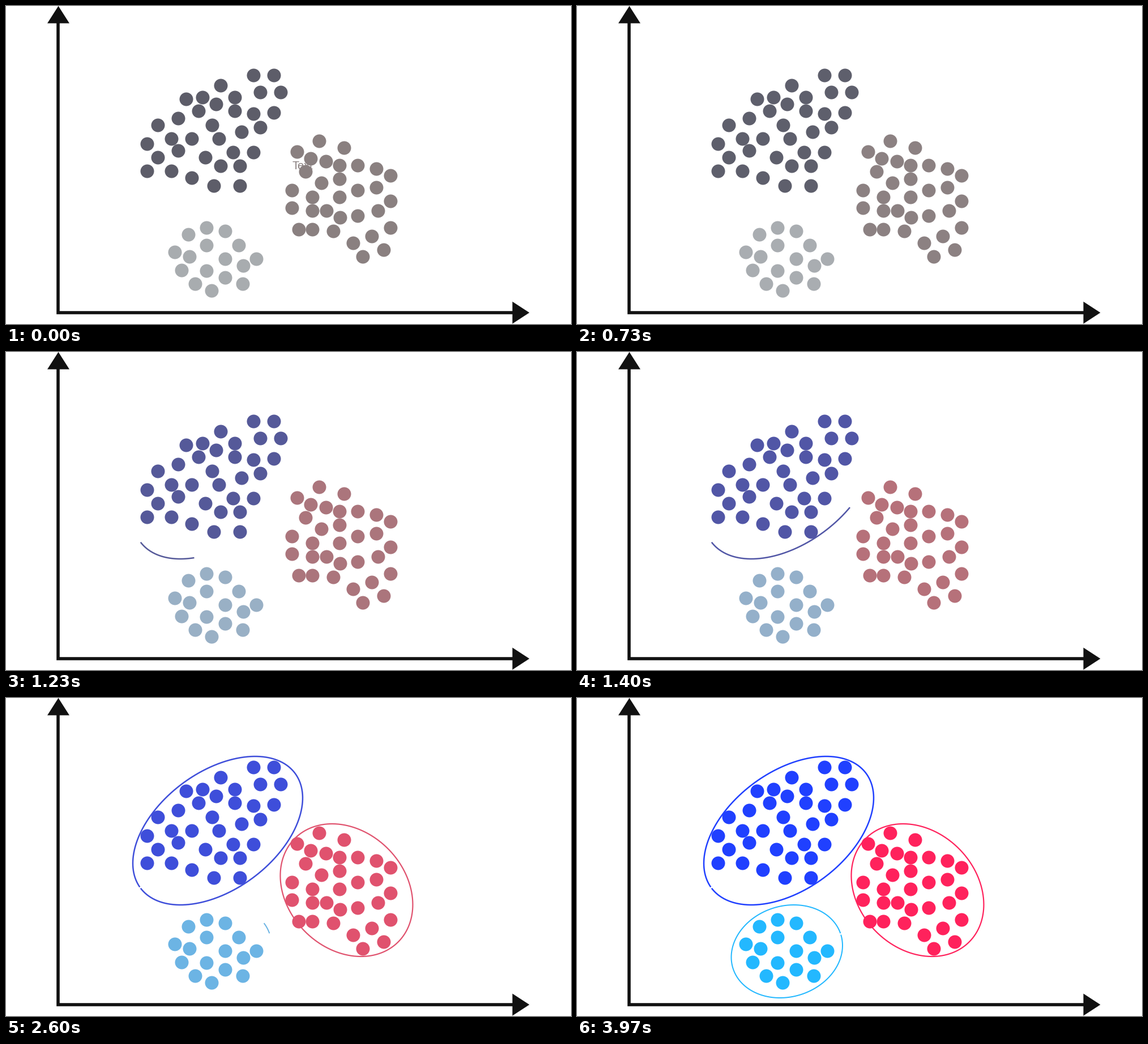
Animation, 998 px wide and 561 px high, one loop 4 s. Source, as a matplotlib script:

```python
import numpy as np
import matplotlib.pyplot as plt
from matplotlib.animation import FuncAnimation
from matplotlib.colors import to_rgb

W, H, DPI = 998, 561, 64
PX = 72 / DPI                      # points per pixel
FRAMES, INTERVAL = 125, 32
INK = "#111111"

KEY_TIMES = [0, 430, 570, 1030, 1400, 2600, 3000]
DRAW_MS = 1000

BLUE_DOTS = [
    (437, 121.5), (473, 121.5), (379.5, 140), (449, 152), (485, 152),
    (318, 164), (347.5, 161), (404, 161), (371.5, 173), (340.5, 185),
    (404, 185), (437, 189.5), (473, 188), (304, 197.5), (268, 209.5),
    (364.5, 209.5), (449, 213.5), (416, 221.5), (249, 243), (292, 233.5),
    (328, 233.5), (376.5, 233.5), (304, 255), (268, 267), (352.5, 267),
    (401, 257.5), (437, 257.5), (249, 290.5), (292, 290.5), (328, 302.5),
    (379.5, 281.5), (413, 281.5), (367.5, 317), (413, 317)]
RED_DOTS = [
    (553, 237.5), (597.5, 249.5), (514, 257), (538.5, 269), (565, 273.5),
    (589, 281), (621.5, 281), (654.5, 287), (679, 299), (529.5, 291.5),
    (557.5, 311.5), (589, 305), (621.5, 324.5), (654.5, 320), (505.5, 324.5),
    (541.5, 337), (589, 337), (679, 344), (505.5, 355.5), (541.5, 361),
    (566, 361), (590, 373), (621.5, 370), (657.5, 361), (517.5, 394),
    (541.5, 394), (578, 397), (679, 391), (646, 406), (613.5, 418),
    (667, 430), (630.5, 442)]
CYAN_DOTS = [
    (354.5, 391), (322, 403), (387, 397), (354.5, 421.5), (411, 421.5),
    (298, 433.5), (324, 442), (387, 445.5), (442.5, 445.5), (419.5, 457.5),
    (310, 465.5), (354.5, 466.5), (387, 478.5), (334, 490), (418.5, 490),
    (363, 502)]


def ease(p):
    p = min(max(p, 0), 1)
    return (1 - np.cos(np.pi * p)) / 2


def ellipse(cx, cy, half_w, half_h, corr, start):
    """Tilted ellipse as evenly spaced points, counterclockwise from start."""
    def at(t):
        return np.column_stack([cx + half_w * np.cos(t),
                                cy + half_h * np.cos(t - np.arccos(corr))])
    t = np.linspace(0, 2 * np.pi, 2000)
    t0 = t[np.argmin(np.hypot(*(at(t) - start).T))]
    pts = at(t0 - t)
    length = np.r_[0, np.cumsum(np.hypot(*np.diff(pts, axis=0).T))]
    even = np.linspace(0, length[-1] - 2.5, 800)
    return np.column_stack([np.interp(even, length, c) for c in pts.T])


class Cluster:
    def __init__(self, dots, colors, begin, width, shape):
        self.keys = np.array([to_rgb(c) for c in colors.split()])
        self.begin = begin
        self.outline = ellipse(*shape)
        self.dots = ax.scatter(*zip(*dots), s=(24 * PX) ** 2,
                               linewidths=0, zorder=2)
        self.line, = ax.plot([], [], lw=width * PX, zorder=3,
                             solid_capstyle="butt")

    def color(self, ms):
        return [np.interp(ms, KEY_TIMES, c) for c in self.keys.T]

    def update(self, ms):
        color = self.color(ms)
        self.dots.set_facecolor(color)
        self.line.set_color(color)
        n = int(ease((ms - self.begin) / DRAW_MS) * len(self.outline))
        self.line.set_data(*self.outline[:n].T)


fig = plt.figure(figsize=(W / DPI, H / DPI), dpi=DPI, facecolor="white")
ax = fig.add_axes([0, 0, 1, 1])
ax.set(xlim=(0, W), ylim=(H, 0))
ax.axis("off")
ax.set_autoscale_on(False)

# Axes with arrowheads
ax.plot([92.5, 92.5, 897], [28, 541, 541], color=INK, lw=5.6 * PX,
        solid_capstyle="butt", solid_joinstyle="miter")
for head in ([(92.5, 0), (73, 30.5), (112, 30.5)],
             [(924.5, 541), (894.5, 521.5), (894.5, 560.5)]):
    ax.fill(*zip(*head), color=INK, lw=0)

blue = Cluster(BLUE_DOTS,
               "#5d5d69 #606060 #606060 #5a5c8a #5056a8 #3e4eda #2040ff",
               990, 2.5, (374, 234, 150, 131, -0.44, (238.5, 335)))
red = Cluster(RED_DOTS,
              "#8a8080 #848484 #848484 #9e7a7e #b8707a #e0526e #ff225c",
              1500, 2.2, (601.5, 339, 117, 117, 0.218, (517, 401)))
cyan = Cluster(CYAN_DOTS,
               "#a8acaf #acacac #acacac #a0b0be #93b0cb #6cb4e4 #23b8ff",
               2467, 2, (370.75, 447, 98.25, 82, -0.125, (465.5, 415)))
clusters = [blue, red, cyan]

label = ax.text(506, 288, "Text", family="Liberation Sans", size=20 * PX,
                va="baseline", zorder=1)


def update(frame):
    ms = frame * INTERVAL
    for cluster in clusters:
        cluster.update(ms)
    label.set_color(red.color(ms))
    label.set_visible(ms < 30)
    return []


anim = FuncAnimation(fig, update, frames=FRAMES, interval=INTERVAL,
                     repeat=True, repeat_delay=0, blit=False)
plt.show()
```
